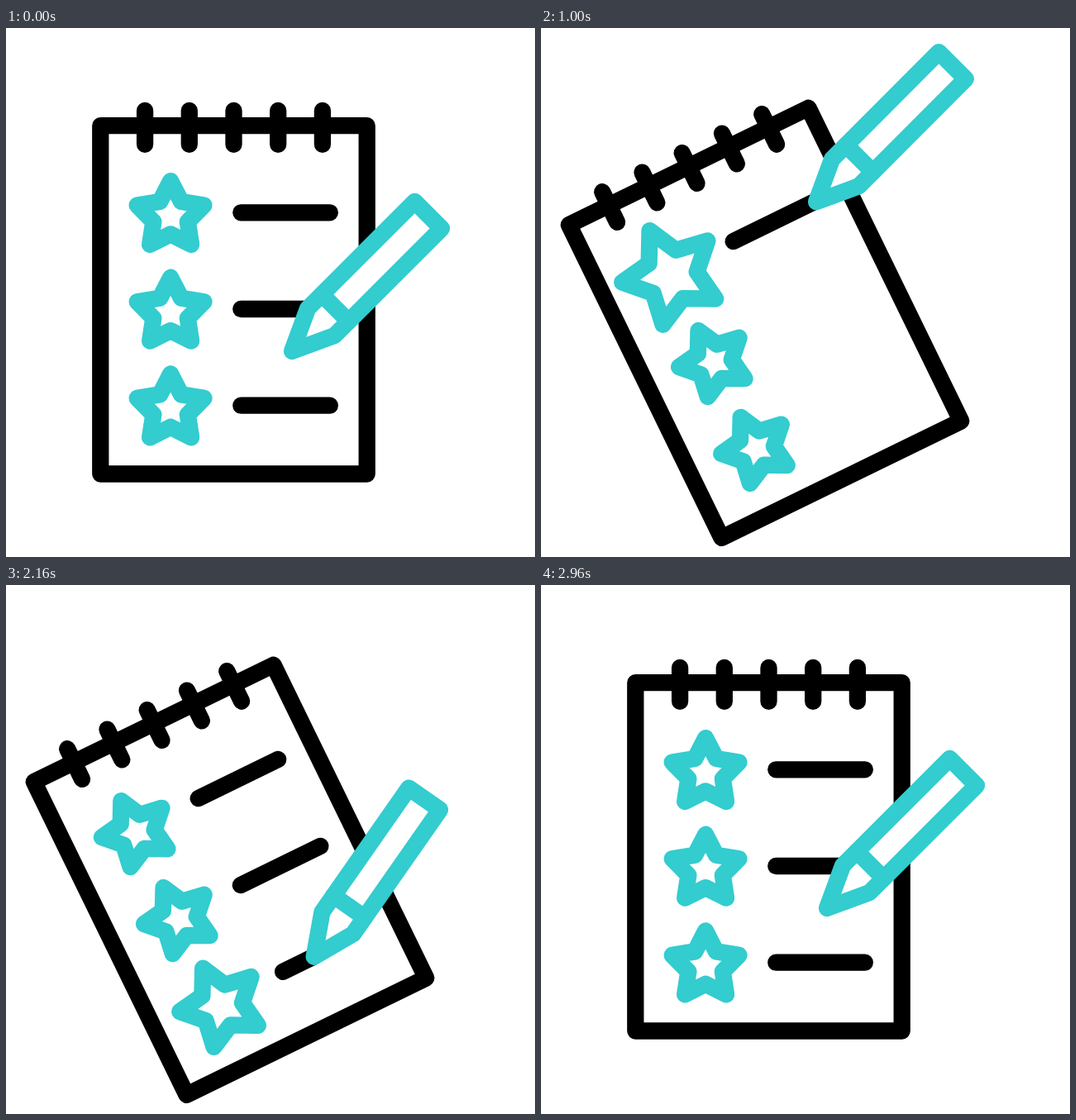
Animation, 640 px wide and 640 px high, one loop 3 s. Source, as an HTML page with a canvas:

```html
<!DOCTYPE html>
<html lang="en">
<head>
<meta charset="utf-8">
<title>Checklist</title>
<style>
  html, body { margin: 0; width: 100%; height: 100%; overflow: hidden; background: #fff; }
  canvas { display: block; width: 100vmin; height: 100vmin; }
</style>
</head>
<body>
<canvas id="stage" width="640" height="640"></canvas>
<script>
const ctx = document.getElementById('stage').getContext('2d');
const LOOP = 3000, BLACK = '#000', TEAL = '#33cccf', RAD = Math.PI / 180;
const ROWS = [0, 1, 2], ROW_GAP = 116.7;
const FIRST = 542, PERIOD = 715, DRAW = 447;

// Eased progress from 0 to 1 between two times
function ease(t, from, to) {
  const u = Math.min(1, Math.max(0, (t - from) / (to - from)));
  return (1 - Math.cos(Math.PI * u)) / 2;
}

// Pencil keys: time, tip x, tip y, lean in degrees
const REST = [346, 391, 45], READY = [232.3, 258.5, 28.8];
const keys = [[0, ...REST], [180, ...REST], [528, ...READY]];
for (const k of ROWS) {
  const start = FIRST + PERIOD * k;
  const dx = 51 * k, dy = 104.9 * k;
  keys.push([start, READY[0] + dx, READY[1] + dy, READY[2]]);
  keys.push([start + DRAW, 333.3 + dx, 209.6 + dy, 45]);
}
keys.push([2500, ...keys[keys.length - 1].slice(1)], [2860, ...REST], [LOOP, ...REST]);

function pencilPose(t) {
  const i = keys.findIndex(key => key[0] > t);
  const a = keys[i - 1], b = keys[i];
  const p = ease(t, a[0], b[0]);
  return [1, 2, 3].map(j => a[j] + (b[j] - a[j]) * p);
}

function path(points, color, closed) {
  ctx.beginPath();
  for (const [x, y] of points) ctx.lineTo(x, y);
  if (closed) {
    ctx.closePath();
    ctx.fill();
  }
  ctx.strokeStyle = color;
  ctx.stroke();
}

function star(x, y, scale) {
  const points = [];
  for (let i = 0; i < 10; i++) {
    const r = (i % 2 ? 21.8 : 42.5) * scale, a = i * 36 * RAD;
    points.push([x + r * Math.sin(a), y - r * Math.cos(a)]);
  }
  path(points, TEAL, true);
}

function starScale(t, k) {
  const s = t - PERIOD * k;
  return 1 + 0.6 * (ease(s, 645, 872) - ease(s, 872, 1222));
}

function lineLength(t, k) {
  const start = FIRST + PERIOD * k;
  return t < 300 ? 1 - ease(t, 0, 280) : ease(t, start, start + DRAW);
}

// Drawn around the centre of the sheet
function notebook(t) {
  const tilt = ease(t, 180, 641) - ease(t, 2502, 2945);
  ctx.save();
  ctx.translate(275.5 - 4.5 * tilt, 328.8 + 28 * tilt);
  ctx.rotate(-26 * RAD * tilt);
  path([[-161.2, -210.7], [161.2, -210.7], [161.2, 210.7], [-161.2, 210.7]], BLACK, true);
  for (let i = -2; i <= 2; i++) {
    path([[i * 53.7, -228.8], [i * 53.7, -188]], BLACK);
  }
  for (const k of ROWS) {
    const y = k * ROW_GAP, p = lineLength(t, k);
    if (p > 0) path([[8.8, y - 105.5], [8.8 + 107.5 * p, y - 105.5]], BLACK);
    star(-76.4, y - 101.2, starScale(t, k));
  }
  ctx.restore();
}

function pencil(t) {
  const [x, y, lean] = pencilPose(t);
  ctx.save();
  ctx.translate(x, y);
  ctx.rotate(lean * RAD);
  path([[0, 0], [-23, -50], [-23, -233], [23, -233], [23, -50]], TEAL, true);
  path([[-23, -74], [23, -74]], TEAL);
  ctx.restore();
}

function frame() {
  const t = performance.now() % LOOP;
  ctx.fillStyle = '#fff';
  ctx.fillRect(0, 0, 640, 640);
  ctx.lineWidth = 20.3;
  ctx.lineCap = ctx.lineJoin = 'round';
  notebook(t);
  pencil(t);
  requestAnimationFrame(frame);
}
frame();
</script>
</body>
</html>
```
